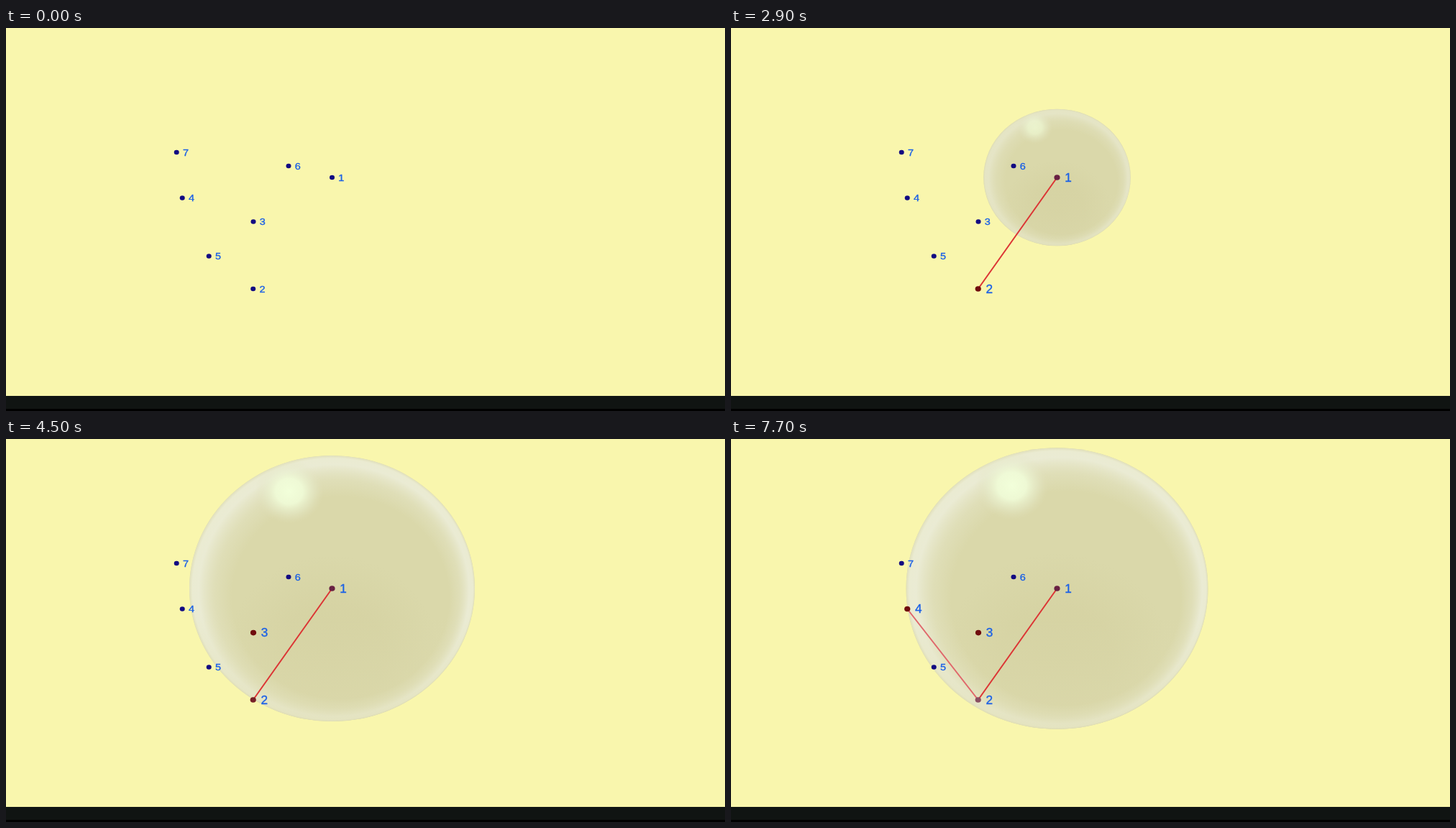
These frames come from a looping animation (1000x533 px, 8000 ms). An HTML page with a canvas:

```html
<!DOCTYPE html>
<html lang="en">
<head>
<meta charset="utf-8">
<title>Growing sphere around numbered points</title>
<style>
html, body { margin: 0; height: 100%; overflow: hidden; background: #f9f6ad; }
canvas { display: block; }
</style>
</head>
<body>
<canvas id="stage" width="1000" height="533"></canvas>
<script>
const ctx = document.getElementById('stage').getContext('2d');
const LOOP = 8000, STEP = 100;
const SQUASH = 0.932; // the scene is slightly flattened vertically
const FINAL_R1 = 198.5, FINAL_R2 = 210;

// x, y, time the highlight begins, its duration
const points = [
  [453.5, 208, 200, 400],
  [343.7, 363, 2400, 100],
  [344, 269.6, 4200, 300],
  [245.2, 236.5, 6400, 200],
  [282.2, 317.5, Infinity, 1],
  [393, 192, Infinity, 1],
  [237.2, 173, Infinity, 1]
];

const clamp = v => Math.max(0, Math.min(1, v));
const mix = (a, b, k) => a + (b - a) * k;
const smooth = v => { const u = clamp(v); return u * u * (3 - 2 * u); };
const mixColor = (a, b, k) => `rgb(${a.map((v, i) => Math.round(mix(v, b[i], k)))})`;

function radius(t) {
  if (t < 2500) return 0;
  return FINAL_R1 * smooth((t - 2160) / 1450)
    + (FINAL_R2 - FINAL_R1) * smooth((t - 6330) / 1400);
}

function fillDisc(gradient, stops) {
  stops.forEach(([at, color]) => gradient.addColorStop(at, color));
  ctx.fillStyle = gradient;
  ctx.fillRect(-1, -1, 2, 2);
}

function drawSphere(r) {
  if (!r) return;
  ctx.save();
  ctx.translate(points[0][0], points[0][1]);
  ctx.scale(r, r * SQUASH);
  ctx.beginPath();
  ctx.arc(0, 0, 1, 0, 2 * Math.PI);
  ctx.fillStyle = '#dad8aa';
  ctx.fill();
  ctx.clip();

  fillDisc(ctx.createRadialGradient(0, 0.5, 0, 0, 0.5, 0.75), [
    [0, 'rgba(213,210,162,.9)'], [0.5, 'rgba(213,210,162,.75)'], [1, 'rgba(213,210,162,0)']
  ]);

  // pale rim and highlight become clear as the sphere grows
  ctx.globalAlpha = clamp((r - 22) / 120);
  fillDisc(ctx.createRadialGradient(0.06, 0.07, 0.76, 0, 0, 1), [
    [0, 'rgba(228,228,196,0)'], [0.4, 'rgba(228,228,196,.5)'],
    [0.78, 'rgba(236,237,216,.9)'], [0.93, 'rgba(236,237,214,.9)'], [1, 'rgba(226,225,190,.9)']
  ]);
  fillDisc(ctx.createRadialGradient(-0.3, -0.73, 0, -0.3, -0.73, 0.24), [
    [0, '#f2ffda'], [0.4, 'rgba(240,252,216,.9)'],
    [0.7, 'rgba(232,238,206,.5)'], [1, 'rgba(226,226,190,0)']
  ]);
  fillDisc(ctx.createLinearGradient(0, 0.2, 0, 1), [
    [0, 'rgba(222,220,176,0)'], [1, 'rgba(222,220,176,.5)']
  ]);
  ctx.restore();
}

function drawLine(a, b, color) {
  ctx.beginPath();
  ctx.moveTo(a[0], a[1]);
  ctx.lineTo(b[0], b[1]);
  ctx.strokeStyle = color;
  ctx.lineWidth = 2;
  ctx.stroke();
}

function dotColor(i, lit, t, r) {
  if (i === 0 && r) return 'rgb(104,32,66)';
  if (i === 1 && lit) {
    const cover = 0.3 * smooth((t - 3300) / 300) + 0.7 * smooth((t - 6330) / 1400);
    return mixColor([112, 12, 14], [138, 78, 98], cover);
  }
  return mixColor([18, 10, 130], [112, 12, 14], lit);
}

function drawPoint([x, y, start, duration], i, t, r) {
  const lit = clamp((t - start) / duration);
  const size = mix(14.5, 17.2, lit);
  const rx = mix(3.5, 4.1, lit);
  ctx.beginPath();
  ctx.ellipse(x, y, rx, rx * SQUASH, 0, 0, 2 * Math.PI);
  ctx.fillStyle = dotColor(i, lit, t, r);
  ctx.fill();

  ctx.save();
  ctx.translate(x + mix(8.7, 10.8, lit), y + size * 0.344 * SQUASH);
  ctx.scale(1, SQUASH);
  ctx.font = `${size}px "Liberation Sans", Arial, sans-serif`;
  ctx.fillStyle = ctx.strokeStyle = '#1c62e6';
  ctx.lineWidth = 0.4;
  ctx.fillText(i + 1, 0, 0);
  ctx.strokeText(i + 1, 0, 0);
  ctx.restore();
}

function draw(t) {
  const r = radius(t);
  ctx.fillStyle = '#f9f6ad';
  ctx.fillRect(0, 0, 1000, 512);
  ctx.fillStyle = '#101412';
  ctx.fillRect(0, 512, 1000, 18);
  ctx.fillStyle = '#000';
  ctx.fillRect(0, 530, 1000, 3);

  drawSphere(r);
  if (t >= 2500) drawLine(points[0], points[1], '#dc3434');
  if (t >= 6500) drawLine(points[1], points[3], '#e0666a');
  points.forEach((p, i) => drawPoint(p, i, t, r));
}

const begin = performance.now();
function tick() {
  const t = (performance.now() - begin) % LOOP;
  draw(Math.floor(t / STEP) * STEP);
  requestAnimationFrame(tick);
}
tick();
</script>
</body>
</html>
```
